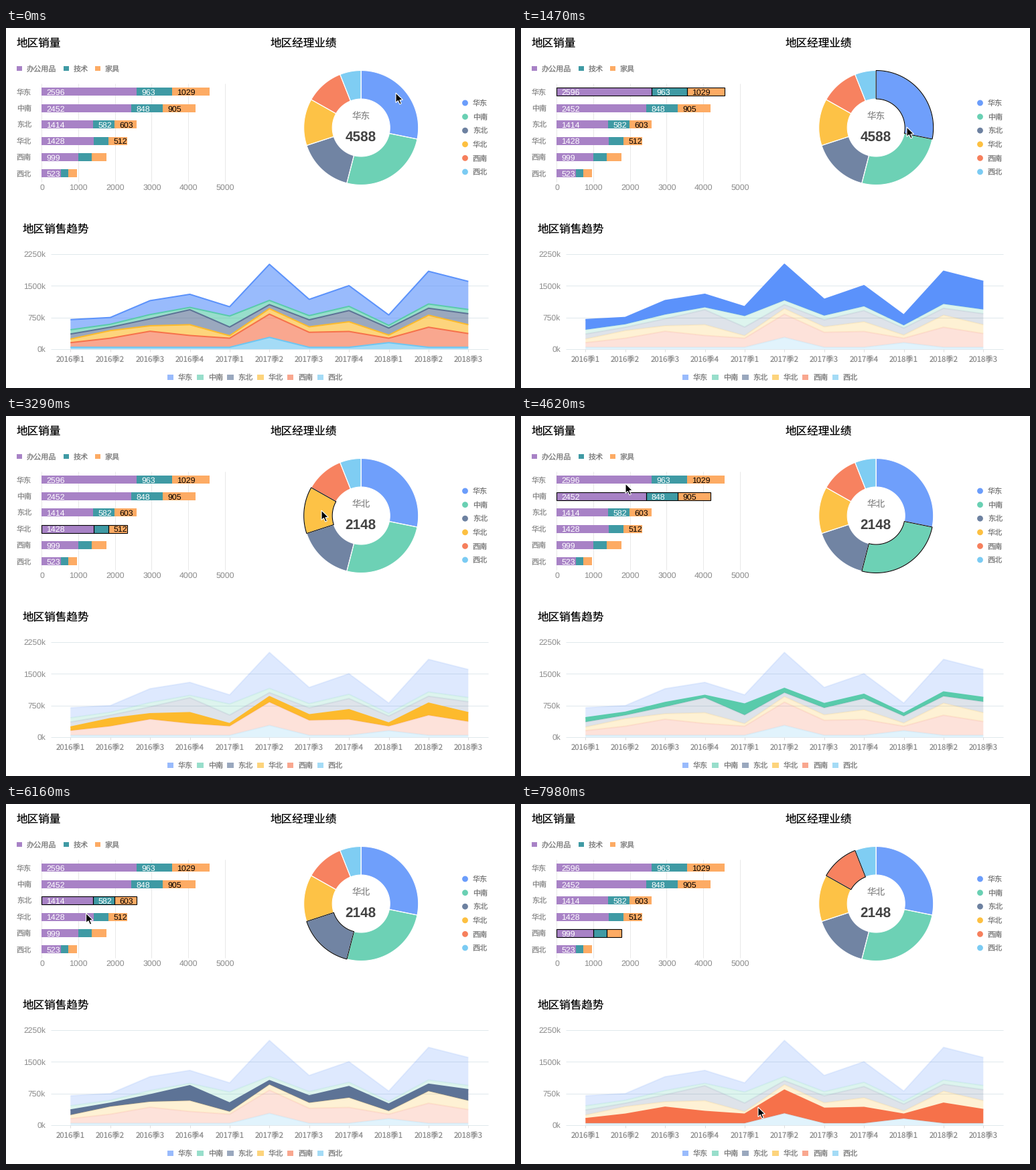
These frames come from a looping animation (760x538 px, 8000 ms). A matplotlib script:

```python
import numpy as np
import matplotlib.pyplot as plt
from matplotlib.animation import FuncAnimation
from matplotlib.patches import Circle, Polygon, Rectangle

W, H, DPI = 760, 538, 100
LOOP, STEP = 8000, 50
PT = 72 / DPI
CJK, SANS = "Noto Sans CJK JP", "Liberation Sans"
GREY, DARK = "#8a8a8a", "#797979"
plt.rcParams["text.hinting"] = "none"
plt.rcParams["toolbar"] = "None"

REGIONS = ["华东", "中南", "东北", "华北", "西南", "西北"]
COLORS = ["#5b92fb", "#59cbab", "#5d7396", "#fdba2c", "#f6714a", "#6dc6f2"]
TOTALS = [4588, 4205, 2599, 2148, 1764, 976]
KINDS = ["办公用品", "技术", "家具"]
KIND_COLORS = ["#a882c6", "#3f9aa4", "#fdab64"]
SALES = [(2596, 963, 1029), (2452, 848, 905), (1414, 582, 603),
         (1428, 395, 512), (999, 365, 400), (523, 207, 246)]

# pointer stops: arrive, leave, x, y, region clicked just before leaving
STOPS = [(0, 500, 582, 97, 0), (950, 1450, 576, 148, 0),
         (1950, 2200, 572, 196, 1), (2600, 2850, 492, 196, 2),
         (3100, 3280, 471, 141, 3), (4300, 4400, 156, 119, 1),
         (4580, 5150, 156, 101, 0), (5440, 6050, 123, 139, 2),
         (6180, 6350, 119, 167, 3), (6700, 7000, 394, 401, 0),
         (7750, LOOP, 354, 453, 4)]
CLICKS = [(0, None)] + [(s[1] - 70, s[4]) for s in STOPS[1:]]
HOVERS = [(s[0] - 200, s[4]) for s in STOPS if s[2] > 400 and s[3] < 250]

fig = plt.figure(figsize=(W / DPI, H / DPI), dpi=DPI, facecolor="white")
ax = fig.add_axes([0, 0, 1, 1])
ax.set_xlim(0, W)
ax.set_ylim(H, 0)
ax.axis("off")


def text(x, y, s, size=11.1, color=GREY, font=CJK, **kw):
    """Text whose capitals are centred on y; size in pixels."""
    return ax.text(x, y + 0.36 * size, s, fontsize=size * PT, color=color,
                   family=font, va="baseline", zorder=6, **kw)


def number(x, y, s, size=12.4, color=GREY, **kw):
    return text(x, y, s, size, color, SANS, **kw)


def rect(x, y, w, h, color, **kw):
    ax.add_patch(Rectangle((x, y), w, h, fc=color, lw=0, zorder=3, **kw))


def line(xs, ys, color, width=1, z=1):
    return ax.plot(xs, ys, color=color, lw=width * PT, zorder=z,
                   solid_joinstyle="round", solid_capstyle="butt")[0]


def outline(points, color="black", z=5, **kw):
    return ax.add_patch(Polygon(points, fill=False, ec=color, lw=1.1 * PT,
                                joinstyle="miter", zorder=z, **kw))


marks = [[] for _ in REGIONS]

text(16, 21.8, "地区销量", 16.6, "black")
text(395, 21.8, "地区经理业绩", 16.6, "black")
text(25, 299.2, "地区销售趋势", 16.6, "black")

# stacked bars
X0, SCALE, BAR = 53, 274 / 5000, 12
for x, name, c in zip((16, 86, 133), KINDS, KIND_COLORS):
    rect(x, 56.5, 7.5, 7.5, c)
    text(x + 15, 61, name, color=DARK)
for v in range(0, 5001, 1000):
    x = X0 + v * SCALE
    line([x, x], [83, 230], "#e8e8e8")
    number(x + 0.5, 237, v, ha="center")
for i, row in enumerate(SALES):
    y = 95.4 + 24.4 * i
    text(16, y + 0.4, REGIONS[i])
    ends = X0 + SCALE * np.cumsum((0,) + row)
    for j, (a, b) in enumerate(zip(ends, ends[1:])):
        rect(a, y - BAR / 2, b - a, BAR, KIND_COLORS[j])
        if b - a > 25:
            number(a + 7.4, y + 0.2, row[j],
                   color="black" if j == 2 else "white")
        top, low = y - BAR / 2, y + BAR / 2
        marks[i].append(outline([(a, top), (b, top), (b, low), (a, low)],
                                visible=False))

# ring
CX, CY, R_OUT, R_IN = 530.2, 149, 85.5, 43
ANGLES = 2 * np.pi * np.cumsum([0] + TOTALS) / sum(TOTALS)
for i, c in enumerate(COLORS):
    a = np.linspace(ANGLES[i], ANGLES[i + 1], 60)
    arc = np.c_[np.sin(a), -np.cos(a)]
    pts = np.r_[arc * R_OUT, arc[::-1] * R_IN] + (CX, CY)
    ax.add_patch(Polygon(pts, fc=c, alpha=0.88, lw=0, zorder=2))
    outline(pts, "white", 3)
    marks[i].append(outline(pts, visible=False))
    y = 112 + 20.6 * i
    ax.add_patch(Circle((685.5, y), 4.4, fc=c, alpha=0.9, lw=0, zorder=3))
    text(697, y + 0.3, REGIONS[i], color=DARK)
mid_name = text(CX - 0.4, 131, "", 13.6, ha="center")
mid_total = number(CX - 0.6, 161.5, "", 20.8, "#434343", ha="center",
                   weight="bold")

# stacked areas, in thousands
Y0, PER_K = 480, 142 / 2250
XS = 96.3 + 59.4 * np.arange(11)


def series(level, peaks):
    return np.array([peaks.get(i, level) for i in range(len(XS))])


total = np.array([700, 750, 1150, 1300, 1005, 2010, 1180, 1505, 810, 1845,
                  1605])
bands = [
    series(45, {5: 280, 8: 155}),
    series(215, {0: 110, 2: 380, 3: 280, 5: 550, 6: 355, 7: 375, 8: 105,
                 9: 475, 10: 325}),
    series(130, {0: 85, 1: 180, 3: 255, 4: 60, 7: 230, 8: 75, 9: 285,
                 10: 210}),
    series(165, {0: 120, 1: 80, 3: 355, 4: 205, 5: 95, 7: 265, 10: 260}),
    series(100, {1: 70, 3: 55, 4: 260, 8: 65}),
]
tops = np.vstack([0 * total, np.cumsum(bands, axis=0), total])
tops = (Y0 - tops * PER_K)[::-1]

for v in range(0, 2251, 750):
    y = Y0 - v * PER_K
    line([67, 720], [y, y], "#e0e8ec")
    number(59, y, f"{v}k", 12.1, ha="right")
for i, x in enumerate(XS):
    line([x, x], [Y0, Y0 + 4], "#dddddd")
    text(x, 494.5, f"{2016 + i // 4}季{i % 4 + 1}", 11.4, ha="center")

fills, strokes = [], []
for i, c in enumerate(COLORS):
    pts = np.r_[np.c_[XS, tops[i]], np.c_[XS, tops[i + 1]][::-1]]
    fills.append(ax.add_patch(Polygon(pts, fc=c, lw=0, zorder=2)))
    strokes.append(line(XS, tops[i], c, 2, 3 - 0.1 * i))
    x = 240.5 + 44.8 * i
    rect(x, 517.8, 9.7, 7.8, c, alpha=0.62)
    text(x + 16.5, 522, REGIONS[i], color=DARK)
line([45, 720], [537.5, 537.5], "#f8f8f8")

ARROW = np.array([(0, 0), (0, 14.5), (3.4, 11.5), (5.9, 17), (8.3, 15.9),
                  (5.9, 10.6), (10.4, 10.3)])
pointer = ax.add_patch(Polygon(ARROW, fc="black", ec="white", lw=1.1 * PT,
                               joinstyle="miter", zorder=10))


def latest(events, t):
    return [value for start, value in events if start <= t][-1]


def pointer_at(t):
    k = max(i for i, s in enumerate(STOPS) if s[0] <= t)
    _, leave, *here, _ = STOPS[k]
    if t <= leave:
        return np.array(here)
    arrive, _, *there, _ = STOPS[k + 1]
    u = (t - leave) / (arrive - leave)
    u = u * u * (3 - 2 * u)
    return np.array(here) * (1 - u) + np.array(there) * u


def update(i):
    t = i * STEP
    active = latest(CLICKS, t)
    for k in range(len(REGIONS)):
        on = k == active
        for m in marks[k]:
            m.set_visible(on)
        if active is None:
            fill, stroke = 0.62, 1
        else:
            fill, stroke = (1, 1) if on else (0.2, 0.1)
        fills[k].set_alpha(fill)
        strokes[k].set_alpha(stroke)
    hover = latest(HOVERS, t)
    mid_name.set_text(REGIONS[hover])
    mid_total.set_text(TOTALS[hover])
    pointer.set_xy(ARROW + pointer_at(t))
    return []


anim = FuncAnimation(fig, update, frames=LOOP // STEP, interval=STEP,
                     init_func=lambda: update(0), repeat=True, repeat_delay=0)
plt.show()
```
